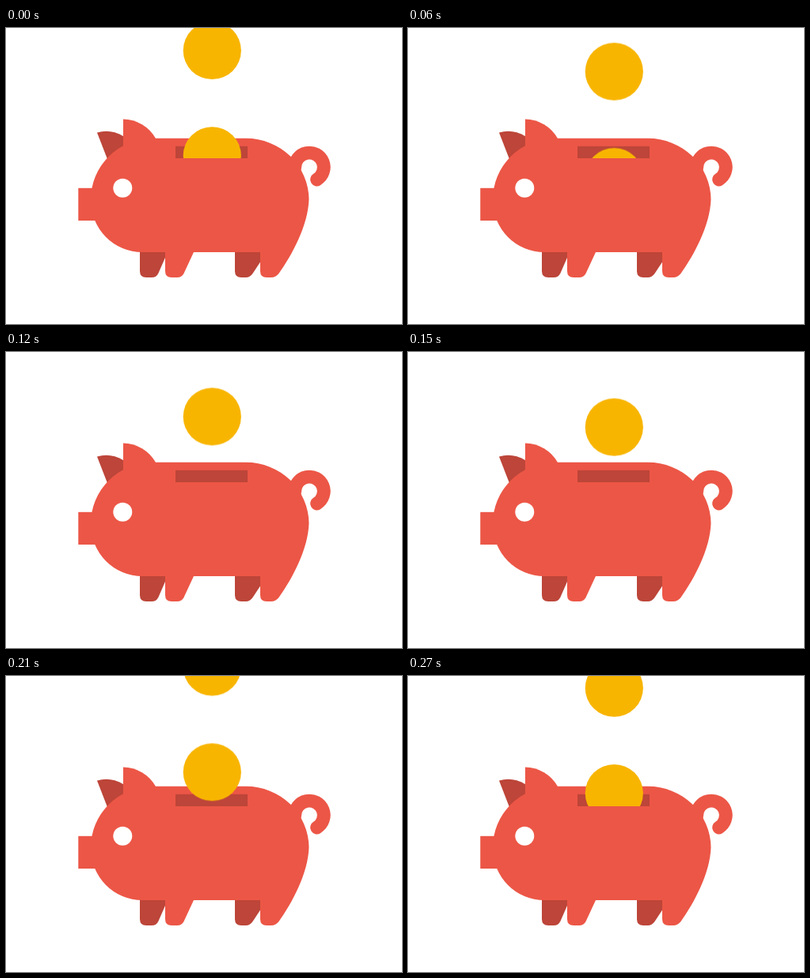
An HTML page that plays this animation: 500x375 px, repeating every 0.3 s.

```html
<!DOCTYPE html>
<html lang="en">
<head>
<meta charset="utf-8">
<title>Piggy bank</title>
<style>
  html, body { margin: 0; width: 100%; height: 100%; overflow: hidden; background: #fff; }
  svg { display: block; width: 500px; height: 375px; }
  .skin { fill: #ec5646; }
  .shade { fill: #bd4539; }
  .tail { fill: none; stroke: #ec5646; stroke-width: 16.8; stroke-linecap: round; }
  .coins { fill: #f8b500; animation: drop 300ms steps(10, end) infinite; }
  @keyframes drop { to { transform: translateY(133.3px); } }
</style>
</head>
<body>
<svg viewBox="0 0 500 375">
  <clipPath id="above"><rect width="500" height="165"/></clipPath>

  <g class="shade">
    <path d="M115 132.5Q132 127.5 148 137V170H129.500Z"/>
    <path d="M169 280V308Q169 316 177 316H184Q190 316 192.500 310.500L204 284V280Z"/>
    <path d="M289 280V308Q289 316 297 316H303Q308 316 311.500 311L326 289V280Z"/>
  </g>

  <path class="tail" d="M364.700 177A18.300 18.300 0 1 1 392.500 192"/>

  <g class="skin">
    <path d="M148 160V115.500A47.500 47.500 0 0 1 189 140V160Z"/>
    <rect x="91.300" y="202.800" width="30" height="41.200"/>
    <path d="M185 139.800H303A79.500 78 0 0 1 382.500 217C381.500 250 361 288 344.500 311Q340.500 316 335 316H329Q321 316 321 308V284H237L224.500 311Q222 316 216 316H209Q201 316 201 308V284H172A65 66 0 0 1 107 218A78 78 0 0 1 185 139.800Z"/>
  </g>

  <circle cx="147.300" cy="202.700" r="12" fill="#fff"/>
  <rect class="shade" x="214" y="149.800" width="91" height="15.200"/>

  <g clip-path="url(#above)">
    <g class="coins">
      <circle cx="260.300" cy="-104.800" r="36.600"/>
      <circle cx="260.300" cy="28.500" r="36.600"/>
      <circle cx="260.300" cy="161.800" r="36.600"/>
    </g>
  </g>
</svg>
</body>
</html>
```
